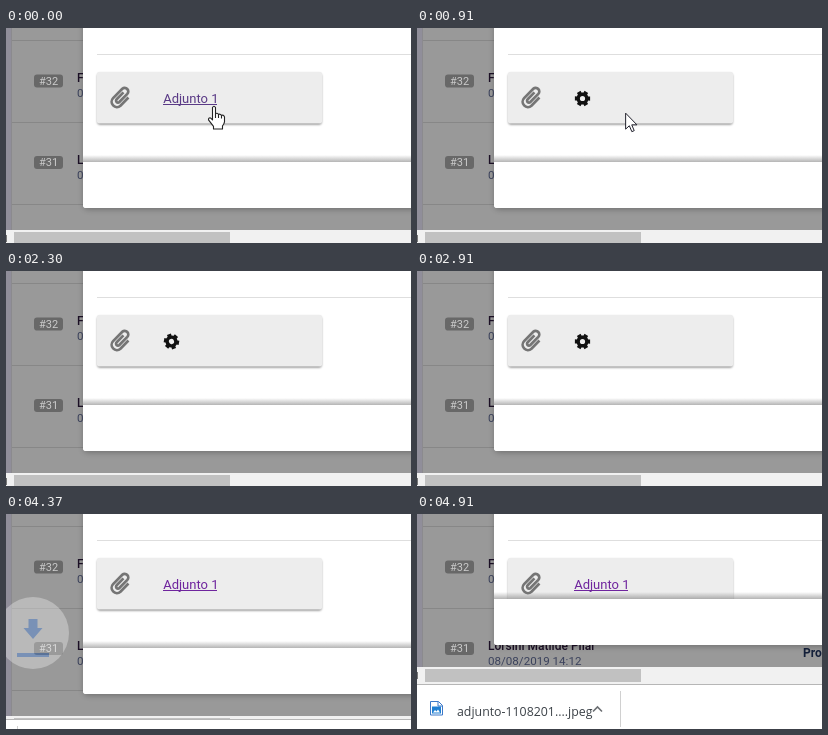
Recreate the animation shown at these times as an HTML page. Size 405x215 px, loop 4.98 s.

```html
<!DOCTYPE html>
<html lang="es">
<head>
<meta charset="utf-8">
<title>Adjunto</title>
<style>
  html, body { margin: 0; width: 100%; height: 100%; overflow: hidden; background: #fff; }
  svg { display: block; width: 405px; height: 215px; }
  text { font-family: Roboto, sans-serif; }
  .badge { font-size: 11px; fill: #cacaca; text-anchor: middle; }
  .name { font-size: 12px; font-weight: 500; fill: #1c1026; }
  .date { font-size: 11.6px; fill: #3b425c; }
  .file { font: 12.35px "Open Sans", sans-serif; fill: #3c4248; }
</style>
</head>
<body>
<svg viewBox="0 0 405 215" xmlns="http://www.w3.org/2000/svg">
  <defs>
    <linearGradient id="rise" x2="0" y2="1">
      <stop offset="0" stop-color="#777" stop-opacity="0"/>
      <stop offset="1" stop-color="#777" stop-opacity=".55"/>
    </linearGradient>
    <filter id="blur" x="-20%" y="-20%" width="140%" height="140%"><feGaussianBlur stdDeviation="3"/></filter>
    <filter id="soft" x="-5%" y="-10%" width="110%" height="125%"><feGaussianBlur stdDeviation="1.3"/></filter>
    <clipPath id="itemClip"><rect id="itemBox" height="60"/></clipPath>
  </defs>

  <!-- dimmed list -->
  <rect width="405" height="215" fill="#999"/>
  <rect width="5" height="215" fill="#908e9a"/>
  <path d="M5.5 0V215" stroke="#8b8a8e"/>
  <path d="M6 12.5H405M6 94.5H405M6 176.5H405" stroke="#878787"/>
  <rect x="28" y="46.5" width="29" height="13" rx="3" fill="#686868"/>
  <text class="badge" x="42.5" y="56.5">#32</text>
  <text class="name" x="71" y="54">F</text>
  <text class="date" x="71" y="69">0</text>
  <rect x="28" y="128" width="29" height="13" rx="3" fill="#686868"/>
  <text class="badge" x="42.5" y="138">#31</text>
  <text class="name" x="71" y="135.5">Lorsini Matilde Pilar</text>
  <text class="date" x="71" y="151">08/08/2019 14:12</text>
  <text class="name" x="386" y="143" style="fill:#14203a;font-weight:700">Pro</text>

  <!-- dialog -->
  <g id="dialogBack">
    <rect x="78" y="-60" width="400" height="241" rx="4" opacity=".3" filter="url(#blur)"/>
    <rect x="77" y="-60" width="400" height="240" rx="3" fill="#fff"/>
  </g>
  <path d="M91 26.5H405" stroke="#dedede"/>
  <rect x="91.5" y="45.5" width="224" height="51" rx="2" opacity=".5" filter="url(#soft)"/>
  <rect x="91" y="44" width="225" height="51.5" rx="2" fill="#ededed"/>
  <path transform="translate(114 69.5) scale(.0435) translate(-224 -256)" fill="none" stroke="#757575" stroke-width="62"
    d="M418 257L234 444A121 121 0 0 1 66 270L277 56A82.5 82.5 0 0 1 392 174L209 361A44 44 0 0 1 148 297L303 139"/>
  <g id="link">
    <text x="157.2" y="75" font-size="13">Adjunto 1</text>
    <rect x="157" y="76" width="54" height="1"/>
  </g>
  <path id="gear" fill="#111" fill-rule="evenodd"/>
  <g id="footer">
    <rect x="77" y="127" width="328" height="7" fill="url(#rise)"/>
    <path d="M77 134H405V180H80a3 3 0 0 1-3-3Z" fill="#fff"/>
  </g>

  <!-- horizontal scrollbar -->
  <g id="scroll">
    <rect y="202" width="405" height="60" fill="#f1f1f1"/>
    <rect x="8" y="204" width="216" height="13" fill="#c1c1c1"/>
    <rect y="207" width="1" height="7" fill="#777"/>
  </g>

  <!-- download shelf -->
  <g id="shelf">
    <rect width="405" height="60" fill="#fff"/>
    <rect width="405" height="1" fill="#b6b6b6"/>
    <g clip-path="url(#itemClip)">
      <circle id="ring" cx="19" cy="24" r="12.7" fill="#dbe7fa" stroke="#4a82dc" stroke-width="1.6"/>
      <path d="M13.5 17.5h8l4 4v9.5h-12z" fill="#fff" stroke="#3c78c8"/>
      <path d="M21 17.5v4.5h4.5" fill="none" stroke="#3c78c8"/>
      <path d="M15 22.5h9v7h-9z" fill="#1f7fd2"/>
      <path d="M16 28.5l2-2.5 1.5 1.5 1.5-2 2 3z" fill="#fff"/>
      <text class="file" x="40" y="31.5">adjunto-1108201....jpeg</text>
    </g>
    <g id="itemEnd">
      <path d="M-28 27.5l4.5-4.5 4.5 4.5" fill="none" stroke="#6c6f73" stroke-width="1.6"/>
      <rect x="-1" y="7" width="1" height="36" fill="#d0d0d0"/>
    </g>
  </g>

  <!-- download started badge -->
  <g id="drop">
    <circle r="36" fill="#f2f2f2"/>
    <path d="M-4.5-14h9v9h5L0 6-9.5-5h5zM-16 20h32v4h-32z" fill="#4285e8"/>
  </g>

  <g id="hand" fill="#fff" stroke="#222" stroke-width="1.1" stroke-linejoin="round">
    <path d="M-1.5 1.5Q0-1 1.5 1.5V8Q3 6.5 4.5 8.5 6 7.5 7.5 9.5 9.5 8.5 10.5 11V16Q10 18.5 8.5 20V23H-.5V20.5L-5.5 14Q-5.5 11.5-3.5 12L-1.5 14Z"/>
    <path d="M1.5 8V12M4.5 8.5V12M7.5 9.5V12.5" fill="none"/>
  </g>
  <path id="arrow" d="M0 0V16L3.7 12.6 6.2 18.5 8.6 17.5 6.1 11.7H11.3Z" fill="#fff" stroke="#20202c" stroke-linejoin="round"/>
</svg>
<script>
const LOOP = 4980;
const SPIN = 410, READY = 4210, DROP = 4310, SHELF = 4353;
const SHELF_TIME = 120, ITEM_TIME = 600, DROP_TIME = 600;
const SHELF_HEIGHT = 49, BOTTOM = 219; // the window ends just below the stage
const $ = id => document.getElementById(id);
const clamp = v => Math.max(0, Math.min(1, v));
const easeOut = v => 1 - (1 - clamp(v)) ** 2;
const show = (id, on) => $(id).style.display = on ? '' : 'none';
const move = (id, x, y) => $(id).setAttribute('transform', `translate(${x} ${y})`);

// time, x, y of the pointer tip
const path = [
  [0, 208, 78], [220, 207.5, 67], [450, 207, 60.5], [600, 206, 58],
  [750, 206, 65], [910, 208.5, 85], [1070, 229, 108], [1420, 368, 154]
];

function pointer(t) {
  let i = 1;
  while (i < path.length - 1 && path[i][0] < t) i++;
  const [a, b] = [path[i - 1], path[i]];
  const k = clamp((t - a[0]) / (b[0] - a[0]));
  return [a[1] + (b[1] - a[1]) * k, a[2] + (b[2] - a[2]) * k];
}

function gearPath() {
  const points = [];
  for (let i = 0; i < 6; i++) {
    for (const [r, d] of [[6.1, -19.5], [7.9, -15.5], [7.9, 15.5], [6.1, 19.5]]) {
      const a = (i * 60 + d - 90) * Math.PI / 180;
      points.push((r * Math.cos(a)).toFixed(2) + ' ' + (r * Math.sin(a)).toFixed(2));
    }
  }
  return `M${points.join('L')}ZM2.6 0A2.6 2.6 0 1 0-2.6 0 2.6 2.6 0 1 0 2.6 0Z`;
}

function render(t) {
  const busy = t >= SPIN && t < READY;
  show('link', !busy);
  $('link').setAttribute('fill', t < SPIN ? '#5a3a86' : '#6f259e');
  show('gear', busy);
  $('gear').setAttribute('transform', `translate(165.5 70.5) rotate(${(t - SPIN) * 0.18})`);

  const [x, y] = pointer(t);
  show('hand', t < SPIN);
  show('arrow', t >= SPIN && t < 1450);
  move('hand', x, y);
  move('arrow', x, y);

  // the page shrinks once the shelf is fully open
  const lift = t >= SHELF + SHELF_TIME ? -SHELF_HEIGHT : 0;
  for (const id of ['dialogBack', 'footer', 'scroll']) move(id, 0, lift);

  show('shelf', t >= SHELF);
  move('shelf', 0, BOTTOM - Math.round(SHELF_HEIGHT * easeOut((t - SHELF) / SHELF_TIME)));
  const width = Math.round(205 * easeOut((t - SHELF) / ITEM_TIME));
  $('itemBox').setAttribute('width', width);
  move('itemEnd', width, 0);
  show('ring', t < 4880);

  const v = (t - DROP) / DROP_TIME;
  show('drop', v > 0 && v < 1);
  move('drop', 27, 111.6 + 72 * v);
  $('drop').setAttribute('opacity', clamp(1 - 4 * (v - 0.5) ** 2));
}

$('gear').setAttribute('d', gearPath());
const start = performance.now();
function tick() {
  render((performance.now() - start) % LOOP);
  requestAnimationFrame(tick);
}
render(0);
requestAnimationFrame(tick);
</script>
</body>
</html>
```
